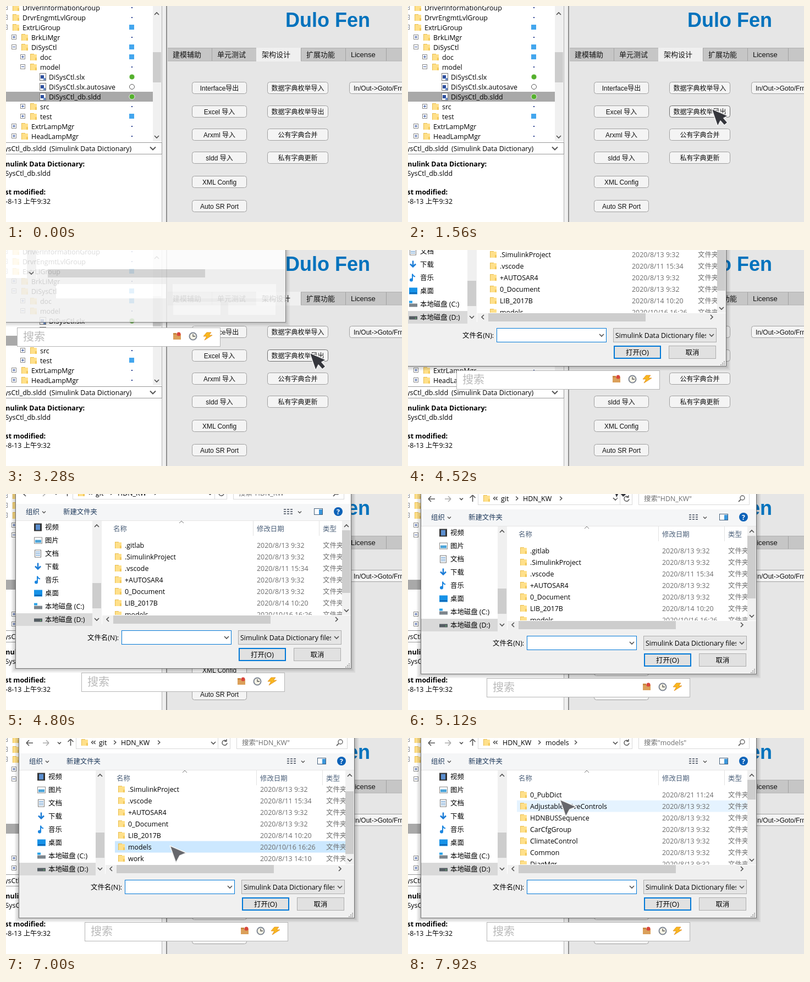
Write an HTML page that moves like this. It is 720x393 px and loops after 8000 ms.

```html
<!DOCTYPE html>
<html lang="zh">
<head>
<meta charset="utf-8">
<style>
html, body { margin: 0; width: 100%; height: 100%; overflow: hidden; background: #fff; }
svg { display: block; width: 100%; height: 100%; }
text { font: 12.4px "Open Sans", "Noto Sans CJK SC", "Noto Sans CJK JP", sans-serif; white-space: pre; }
.ui { font: 12px "Liberation Sans", "Noto Sans CJK SC", "Noto Sans CJK JP", sans-serif; }
.tab { font-size: 13px; }
.title { font-size: 36px; font-weight: bold; }
.bold { font-weight: bold; }
.big { font-size: 20px; }
</style>
</head>
<body>
<svg id="stage" viewBox="0 0 720 393"></svg>
<script>
const rect = (x, y, w, h, fill, more = '') =>
  `<rect x="${x}" y="${y}" width="${w}" height="${h}" fill="${fill}" ${more}/>`;
const box = (x, y, w, h, fill, stroke, more = '') =>
  rect(x + .5, y + .5, w - 1, h - 1, fill, `stroke="${stroke}" ${more}`);
// y is the middle of the line
const text = (x, y, s, fill = '#000', more = '') =>
  `<text x="${x}" y="${y + 4.5}" fill="${fill}" ${more}>${s}</text>`;
const line = (d, stroke, w = 1, more = '') =>
  `<path d="${d}" fill="none" stroke="${stroke}" stroke-width="${w}" ${more}/>`;
const disc = (x, y, r, fill, more = '') => `<circle cx="${x}" cy="${y}" r="${r}" fill="${fill}" ${more}/>`;
const group = (id, s, more = '') => `<g id="${id}" ${more}>${s}</g>`;
const END = 'text-anchor="end"', MID = 'text-anchor="middle"';

const chevron = (x, y, dir, size = 4, color = '#505050', w = 1.6) => {
  const turn = { down: 0, left: 90, up: 180, right: 270 }[dir];
  return line(`M${-size} ${-size / 2}L0 ${size / 2}L${size} ${-size / 2}`, color, w,
    `transform="translate(${x} ${y}) rotate(${turn})"`);
};
const folder = (x, y) =>
  rect(x, y - 6, 7, 12, '#e8bd4e') + rect(x + 1, y - 5, 11, 11, '#ffe08a') + rect(x + 9, y + 1, 3, 5, '#f3c95d');

function tree() {
  const rows = [
    [0, 'DriverInformationGroup', '+', 'dot'], [0, 'DrvrEngmtLvlGroup', '+', 'dot'],
    [0, 'ExtrLiGroup', '-', 'sq'], [1, 'BrkLiMgr', '+', 'dot'], [1, 'DiSysCtl', '-', 'sq'],
    [2, 'doc', '+', 'sq'], [2, 'model', '-', 'dot'], [3, 'DiSysCtl.slx', '', 'ok'],
    [3, 'DiSysCtl.slx.autosave', '', 'open'], [3, 'DiSysCtl_db.sldd', '', 'ok'],
    [2, 'src', '+', 'dot'], [2, 'test', '+', 'sq'], [1, 'ExtrLampMgr', '+', 'dot'], [1, 'HeadLampMgr', '+', 'dot']
  ];
  const marks = {
    dot: y => rect(228, y - 1, 2, 2, '#223a8c'),
    sq: y => rect(224, y - 5, 9, 9, '#43a6ee'),
    ok: y => disc(229, y, 5, '#55b02e', 'stroke="#fff" stroke-width=".8"'),
    open: y => disc(229, y, 4.5, '#fff', 'stroke="#555"')
  };
  return rect(0, 156, 283, 18, '#a9a9a9') + rows.map(([level, name, sign, mark], i) => {
    const y = 3 + 18 * i, x = 30 + 16 * level;
    let icon = folder(x - 18, y);
    if (level == 3) icon = box(x - 17, y - 7, 12, 14, '#fff', '#777') +
      rect(x - 15, y - 3, 6, 6, '#2d4f9e') + rect(x - 10, y + 2, 4, 4, '#6d8fc8');
    if (sign) {
      const sx = x - 32;
      icon += box(sx - 4, y - 5, 9, 9, '#fff', '#8a8a8a') +
        line(`M${sx - 2} ${y - .5}h5` + (sign == '+' ? `M${sx + .5} ${y - 3}v5` : ''), '#34529c');
    }
    return icon + text(x, y, name) + marks[mark](y);
  }).join('');
}

function leftPane() {
  return rect(0, 0, 283, 393, '#fff') + tree() +
    rect(267, 0, 16, 246, '#f0f0f0') + rect(267, 84, 15, 55, '#cdcdcd') +
    chevron(274, 14, 'up') + chevron(274, 238, 'down') +
    box(-2, 248, 286, 22, '#fff', '#999') +
    text(73, 259, 'DiSysCtl_db.sldd', '#000', END) + text(79, 259, '(Simulink Data Dictionary)') +
    chevron(267, 259, 'down', 5, '#555', 2) +
    text(143, 287, 'Simulink Data Dictionary:', '#000', END + ' class="bold"') +
    text(81, 304, 'DiSysCtl_db.sldd', '#000', END) +
    text(72, 338, 'Last modified:', '#000', END + ' class="bold"') +
    text(81, 355, '2020-8-13 上午9:32', '#000', END);
}

function rightPane() {
  const tabs = ['建模辅助', '单元测试', '架构设计', '扩展功能', 'License'];
  const columns = [
    [338, 100, ['Interface导出', 'Excel 导入', 'Arxml 导入', 'sldd 导入', 'XML Config', 'Auto SR Port']],
    [475, 111, ['数据字典枚举导入', '数据字典枚举导出', '公有字典合并', '私有字典更新']],
    [624, 116, ['In/Out->Goto/Frm']]
  ];
  const rowY = [149, 192, 234, 276, 320, 364];
  let s = rect(283, 0, 10, 393, '#efefef') + rect(283, 0, 1, 393, '#b4b4b4') +
    rect(291, 0, 2, 393, '#8f8f8f') + rect(293, 0, 427, 393, '#e6e6e6') +
    text(662, 33.5, 'Dulo Fen', '#0072bd', END + ' class="ui title"') +
    rect(294, 76, 426, 24, '#c6c6c6') + line('M294 76.5H720M294 100H720', '#b0b0b0');
  tabs.forEach((name, i) => {
    const x = 293 + 81 * i;
    if (i == 2) s += rect(x, 76, 81, 25, '#f0f0f0');
    s += rect(i == 4 ? 691 : x + 81, 77, 1, 23, '#a2a2a2') + text(x + 10, 88.5, name, '#111', 'class="ui tab"');
  });
  columns.forEach(([x, w, names], c) => names.forEach((name, r) => {
    const id = c == 1 && r == 1 ? 'id="export"' : '';
    s += box(x, rowY[r] - 11, w, 22, '#f4f4f4', '#a0a0a0', `rx="4" ${id}`) +
      text(c == 2 ? 632 : x + w / 2, rowY[r], name, '#111', 'class="ui" ' + (c == 2 ? '' : MID));
  }));
  return s;
}

const usual = '2020/8/13 9:32';
const listing = files => files.map(([name, date = usual], i) => {
  const y = 103 + 21 * i;
  return folder(204, y) + text(222, y, name) + text(462, y, date, '#6d6d6d') + text(582, y, '文件夹', '#6d6d6d');
}).join('');

const rootList = listing([['.gitlab'], ['.SimulinkProject'], ['.vscode', '2020/8/11 15:34'], ['+AUTOSAR4'],
  ['0_Document'], ['LIB_2017B', '2020/8/14 10:20'], ['models', '2020/10/16 16:26'], ['work', '2020/8/13 14:10']]);
const modelList = listing([['0_PubDict', '2020/8/21 11:24'], ['AdjustableDriveControls'], ['HDNBUSSequence'],
  ['CarCfgGroup'], ['ClimateControl'], ['Common'], ['DiagMgr']]);

const crumbs = (a, ax, b, bx, endX) => text(ax, 8, a) + chevron(bx - 11, 8, 'right', 3.5) +
  text(bx, 8, b) + chevron(endX, 8, 'right', 3.5) + text(429, 8, `搜索"${b}"`, '#6d6d6d');

function places() {
  const names = ['视频', '图片', '文档', '下载', '音乐', '桌面', '本地磁盘 (C:)', '本地磁盘 (D:)'];
  const icons = [
    y => rect(57, y - 7, 14, 14, '#333') + rect(60, y - 5, 8, 10, '#5b8fd0'),
    y => box(57, y - 6, 15, 12, '#fff', '#888') + rect(59, y - 1, 11, 5, '#4aa3d8'),
    y => box(58, y - 7, 12, 14, '#fff', '#777') + line(`M60 ${y - 3}h8m-8 3h8m-8 3h8`, '#4a8ac8'),
    y => line(`M64 ${y - 7}v11m-5 -5l5 5l5 -5`, '#1c7cd6', 2.6),
    y => line(`M63 ${y + 4}v-11q1 4 5 5`, '#1c86e0', 2) + disc(61, y + 4, 3, '#1c86e0'),
    y => rect(57, y - 6, 15, 12, '#1692e8') + rect(58, y + 3, 13, 2, '#0a5ca8'),
    y => rect(57, y - 1, 15, 6, '#7d858c') + rect(57, y - 6, 6, 4, '#27a2e8'),
    y => rect(57, y - 2, 15, 6, '#555d63') + rect(68, y + 1, 2, 1, '#6f6')
  ];
  return rect(24, 227, 139, 23, '#d9d9d9') +
    names.map((name, i) => icons[i](70.5 + 24 * i) + text(77, 70.5 + 24 * i, name)).join('');
}

function dialog() {
  const shadow = [2, 6, 10, 15].map(w =>
    line('M23.5 -150V327.5H633.5V-150', '#000', w, 'opacity=".06"')).join('');
  const frame = rect(24, -150, 609, 477, '#f0f0f0') + rect(24, -150, 609, 178, '#fff') +
    rect(24, 28, 609, 30, '#f5f6f7') + rect(24, 58, 609, 189, '#fff') +
    rect(163, 59, 17, 188, '#f0f0f0') + rect(181, 231, 452, 16, '#f0f0f0') +
    rect(201, 231, 286, 15, '#cdcdcd') + chevron(171, 238, 'down') +
    rect(216, 258, 200, 26, '#fff') + rect(428, 258, 188, 26, '#f9f9f9') +
    rect(429, 290, 86, 24, '#f9f9f9') + rect(529, 290, 86, 24, '#f9f9f9');
  const bars = box(127, -6, 281, 26, '#fff', '#d9d9d9') + box(419, -6, 202, 26, '#fff', '#d9d9d9') +
    line('M37 9h12m-12 0l5 -5m-5 5l5 5', '#555', 1.6) + line('M78 9h-11m11 0l-5 -5m5 5l-5 5', '#aaa', 1.5) +
    chevron(97, 9, 'down', 3) + line('M117.5 14v-12m0 0l-5 5m5 -5l5 5', '#555', 1.6) +
    folder(137, 8) + chevron(157, 8, 'left', 3) + chevron(161, 8, 'left', 3) +
    chevron(377, 9, 'down', 4) + rect(385, -5, 1, 24, '#d9d9d9') +
    line('M400 5a4.5 4.5 0 1 0 2 4M401 2v4h-4', '#555', 1.4) +
    disc(608, 7, 4, 'none', 'stroke="#666" stroke-width="1.4"') + line('M605 10l-4 4', '#666', 1.8) +
    text(42, 42, '组织', '#1e395b') + chevron(75, 43, 'down', 3, '#555', 1.4) + text(110, 42, '新建文件夹', '#1e395b') +
    line('M511 38h4m2 0h4m2 0h4M511 42h4m2 0h4m2 0h4M511 46h4m2 0h4m2 0h4', '#6d7480', 2) +
    chevron(540, 43, 'down', 3, '#555', 1.4) +
    box(566, 36, 16, 12, '#fff', '#44607c') + rect(575, 38, 6, 9, '#3b97dc') +
    disc(610, 42, 8, '#0c62b8') + text(610, 42, '?', '#fff', MID + ' class="bold"') +
    rect(24, 58, 609, 1, '#e5e5e5');
  const list = `<g clip-path="url(#listClip)">${rect(198, 0, 419, 21, '#e5f3ff', 'id="hover"')}` +
    group('rootList', rootList) + group('modelList', modelList) + '</g>';
  const heads = chevron(325, 61, 'up', 4, '#777', 1) + text(201, 73, '名称', '#4c607a') +
    text(462, 73, '修改日期', '#4c607a') + text(582, 73, '类型', '#4c607a') +
    rect(455, 59, 1, 27, '#e2e2e2') + rect(575, 59, 1, 27, '#e2e2e2');
  const scrollers = rect(163, 172, 16, 46, '#cdcdcd') + chevron(171, 68, 'up') +
    rect(617, 59, 16, 171, '#f0f0f0') + rect(617, 76, 15, 112, '#cdcdcd', 'id="thumb"') +
    chevron(625, 68, 'up') + chevron(625, 222, 'down') + chevron(191, 238, 'left') + chevron(607, 238, 'right');
  const form = text(154, 271, '文件名(N):') + box(216, 258, 200, 26, '#fff', '#0078d7') +
    chevron(407, 271, 'down', 4) + rect(220, 263, 1, 17, '#000', 'id="caret"') +
    box(428, 258, 188, 26, '#e5e5e5', '#adadad') +
    `<g clip-path="url(#comboClip)">${text(432, 271, 'Simulink Data Dictionary files')}</g>` +
    chevron(607, 271, 'down', 4) +
    rect(430, 291, 84, 22, '#e1e1e1', 'stroke="#0078d7" stroke-width="2"') + text(472, 302, '打开(O)', '#000', MID) +
    box(529, 290, 86, 24, '#e1e1e1', '#adadad') + text(572, 302, '取消', '#000', MID) +
    line('M630 318v2M630 321v2M630 324v2M627 321v2M627 324v2M624 324v2', '#aaa', 2);
  return shadow + frame + group('details', bars + places() + list + heads + scrollers + form +
    group('rootPath', crumbs('git', 169, 'HDN_KW', 209, 278)) +
    group('modelPath', crumbs('HDN_KW', 172, 'models', 250, 305))) +
    line('M23.5 -150V327.5H633.5V-150', '#707070');
}

const searchBar = () => box(143, 335, 370, 35, '#fff', '#b5b5b5') + text(154, 354, '搜索', '#b9b9b9', 'class="big"') +
  rect(427, 347, 14, 10, '#dba05a') + rect(427, 345, 6, 3, '#c78842') + disc(437, 347, 3.5, '#d8463c') +
  disc(463, 351, 6.5, '#f7f4e6', 'stroke="#7f8794" stroke-width="2"') + line('M463 347v4h4', '#555', 1.3) +
  `<path d="M488 344h8l-4 5h6l-14 9 4 -7h-6z" fill="#f9b81f" stroke="#e08a17" stroke-width=".8"/>`;

document.getElementById('stage').innerHTML =
  `<clipPath id="listClip"><rect x="181" y="82" width="436" height="148"/></clipPath>
   <clipPath id="comboClip"><rect x="429" y="259" width="168" height="24"/></clipPath>` +
  rightPane() + leftPane() + group('dialog', dialog()) + group('search', searchBar()) +
  '<path id="cursor" stroke="#f4f4f4" stroke-width="1.6" stroke-linejoin="round"/>';

const $ = id => document.getElementById(id);
const set = (id, values) => { for (const k in values) $(id).setAttribute(k, values[k]); };
const show = (id, on) => set(id, { visibility: on ? 'inherit' : 'hidden' });
const held = (keys, t) => keys.filter(k => k[0] <= t).pop();

const LOOP = 8000, STEP = 160;
const dragKeys = [[0, -123, -194], [4520, -55, -116], [4640, -24, -48], [4800, -6, -10], [4960, 0, 0]];
const cursorKeys = [[3440, 368, -60], [5120, 368, -24], [5320, 374, 20], [5440, 362, 100], [5600, 345, 190],
  [5760, 325, 244], [5920, 312, 214], [6080, 304, 184], [6240, 301, 187], [6360, 300, 191], [6520, 298, 196],
  [7320, 290, 150], [7480, 281, 122], [7640, 274, 115], [7760, 275, 114], [7920, 276, 112]];
const SHAPES = { tailed: 'M0 0L30 13L22 17L29 25L23 30L16 22L11 32Z', plain: 'M0 0L30 13L18 18L11 31Z' };

function cursorAt(t) {
  if (t >= 3440) return held(cursorKeys, t).slice(1);
  const p = Math.min(1, (Math.floor((t - 600) / STEP) + 1) / 7);
  const ease = 1 - (1 - p) ** 2;
  return [649 - 97 * ease, 443 - 256 * ease];
}

function draw(t) {
  const [, dx, dy] = held(dragKeys, t);
  const fade = t < 2960 ? 0 : Math.min(1, [.3, .6, .86][Math.floor((t - 2960) / STEP)] || 1);
  const opening = t < 3400, inModels = t >= 7160, scroll = t >= 5920 && !inModels ? 31 : 0;
  set('dialog', {
    opacity: fade,
    transform: `translate(${dx - (opening ? 2 : 0)} ${dy - (opening ? 2 : 0)})`
  });
  show('details', !opening);
  set('search', { transform: `translate(${dx} ${dy})` });
  show('search', t >= 3120);
  show('caret', t >= 3600 && t < 4080);

  show('rootList', !inModels);
  show('rootPath', !inModels);
  show('modelList', inModels);
  show('modelPath', inModels);
  set('rootList', { transform: `translate(0 ${-scroll})` });
  set('thumb', { y: scroll ? 97 : 76, height: inModels ? 36 : 114 });

  const [x, y] = cursorAt(t), pointed = cursorAt(t - STEP)[1];
  const row = Math.floor((pointed - 92.5 + scroll) / 21);
  const picked = t >= 6840 && !inModels;
  set('hover', { y: 92.5 + 21 * row - scroll, fill: picked ? '#cce8ff' : '#e5f3ff' });
  show('hover', !opening && t >= 5600 && row >= 0 && row < 8);

  set('export', {
    stroke: t >= 1400 && t < 3440 ? '#6c6c6c' : '#a0a0a0',
    fill: t >= 2000 && t < 2480 ? '#dcdcdc' : '#f4f4f4'
  });
  const early = t < 5600;
  set('cursor', {
    d: early ? SHAPES.tailed : SHAPES.plain,
    fill: early ? '#35363c' : '#66676c',
    transform: `translate(${x} ${y})`
  });
  show('cursor', t >= 600);
}

function tick(now) {
  draw(now % LOOP);
  requestAnimationFrame(tick);
}
draw(0);
requestAnimationFrame(tick);
</script>
</body>
</html>
```
